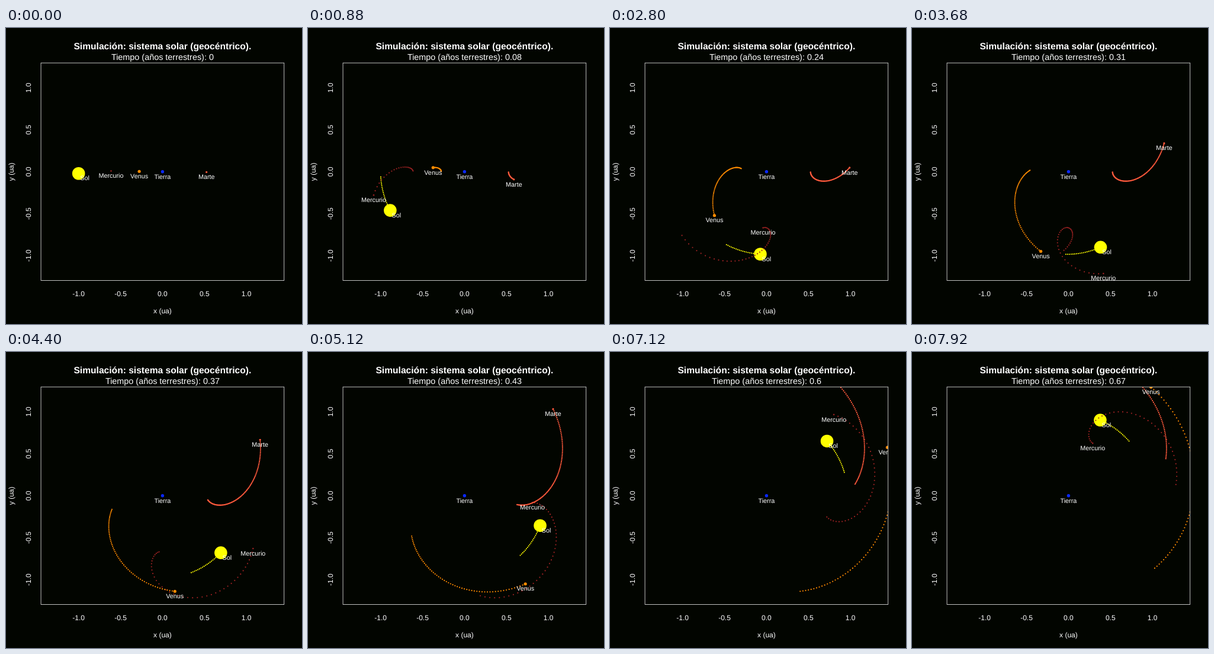
Animation of 500x500 px, one loop 8 s. Source, as an HTML page with a canvas:

```html
<!DOCTYPE html>
<html lang="es">
<head>
<meta charset="utf-8">
<title>Sistema solar geocéntrico</title>
<style>
  html, body { margin: 0; width: 100%; height: 100%; overflow: hidden; background: #020500; }
  canvas, svg { position: absolute; left: 0; top: 0; width: 500px; height: 500px; }
  text {
    font: 12px "Liberation Sans", Arial, sans-serif;
    fill: #fff; text-anchor: middle; text-rendering: geometricPrecision;
  }
  .title { font-size: 15.6px; font-weight: bold; }
  .time { font-size: 14.4px; }
  #names text { font-size: 10.8px; }
</style>
</head>
<body>
<canvas id="sky" width="500" height="500"></canvas>
<svg id="chart" viewBox="0 0 500 500">
  <clipPath id="box"><rect x="59.04" y="59.04" width="410.72" height="367.52"/></clipPath>
  <rect x="59.04" y="59.04" width="410.72" height="367.52" fill="none" stroke="#fff" stroke-width="0.75"/>
  <text class="title" x="264.4" y="36">Simulación: sistema solar (geocéntrico).</text>
  <text class="time" id="time" x="264.4" y="54">Tiempo (años terrestres): 0</text>
  <text x="264.4" y="481.8">x (ua)</text>
  <text transform="translate(12.96 242.8) rotate(-90)">y (ua)</text>
  <g id="ticks"></g>
  <g id="names" clip-path="url(#box)"></g>
</svg>
<script>
const FRAME = 80, FRAMES = 100;
const STEP = 0.003343;               // years per simulation step, two steps per frame
const CX = 264.4, CY = 242.8, UNIT = 141.79;

// a: semi-major axis (au), e: eccentricity, r: radius, trail: length in steps
const earth = { a: 0.98357, e: 0.0167 };
const bodies = [
  { name: 'Sol', color: '#ffff00', r: 10.8, trail: 20, dot: 1.05, dx: 10.5 },
  { name: 'Mercurio', a: 0.322, e: 0.2056, color: '#9c2222', r: 1.3, trail: 40, dot: 1.1 },
  { name: 'Venus', a: 0.7182, e: 0.0067, color: '#ff8c00', r: 2.6, trail: 60, dot: 1.1 },
  { name: 'Tierra', ...earth, color: '#0a28ff', r: 2.7, trail: 0 },
  { name: 'Marte', a: 1.3938, e: 0.0934, color: '#ff5a3c', r: 1.6, trail: 100, dot: 1.15 }
];

const ctx = document.getElementById('sky').getContext('2d');
const timeText = document.getElementById('time');

function addText(parent, str) {
  const el = document.createElementNS('http://www.w3.org/2000/svg', 'text');
  el.textContent = str;
  return document.getElementById(parent).appendChild(el);
}

for (let v = -1; v <= 1; v += 0.5) {
  const x = addText('ticks', v.toFixed(1));
  x.setAttribute('x', CX + v * UNIT);
  x.setAttribute('y', 452.8);
  const y = addText('ticks', v.toFixed(1));
  y.setAttribute('transform', `translate(41.76 ${CY - v * UNIT}) rotate(-90)`);
}
for (const b of bodies) b.label = addText('names', b.name);

// Kepler orbit around the Sun, starting at aphelion on the x axis
function orbit({ a, e }, t) {
  const m = 2 * Math.PI * t / Math.pow(a, 1.5);
  let E = m;
  for (let n = 0; n < 6; n++) E -= (E + e * Math.sin(E) - m) / (1 + e * Math.cos(E));
  return [a * (Math.cos(E) + e), a * Math.sqrt(1 - e * e) * Math.sin(E)];
}

// Screen position as seen from the Earth
function place(body, step) {
  const t = step * STEP;
  const [ex, ey] = orbit(earth, t);
  const [x, y] = body.a ? orbit(body, t) : [0, 0];
  return [CX + (x - ex) * UNIT, CY - (y - ey) * UNIT];
}

function disc([x, y], r) {
  ctx.beginPath();
  ctx.arc(x, y, r, 0, 2 * Math.PI);
  ctx.fill();
}

function draw(frame) {
  const now = 2 * frame + 1;
  ctx.clearRect(0, 0, 500, 500);
  ctx.save();
  ctx.beginPath();
  ctx.rect(59.04, 59.04, 410.72, 367.52);
  ctx.clip();
  for (const b of bodies) {
    const p = place(b, now);
    ctx.fillStyle = b.color;
    disc(p, b.r);
    for (let s = Math.max(1, now - b.trail); s < now; s++) disc(place(b, s), b.dot);
    b.label.setAttribute('x', p[0] + (b.dx || 0));
    b.label.setAttribute('y', p[1] + 11.7);
  }
  ctx.restore();
  timeText.textContent = 'Tiempo (años terrestres): ' + Number((now * STEP).toFixed(2));
}

let shown = -1;
function tick() {
  const frame = Math.floor(performance.now() / FRAME) % FRAMES;
  if (frame !== shown) draw(shown = frame);
  requestAnimationFrame(tick);
}
tick();
</script>
</body>
</html>
```
